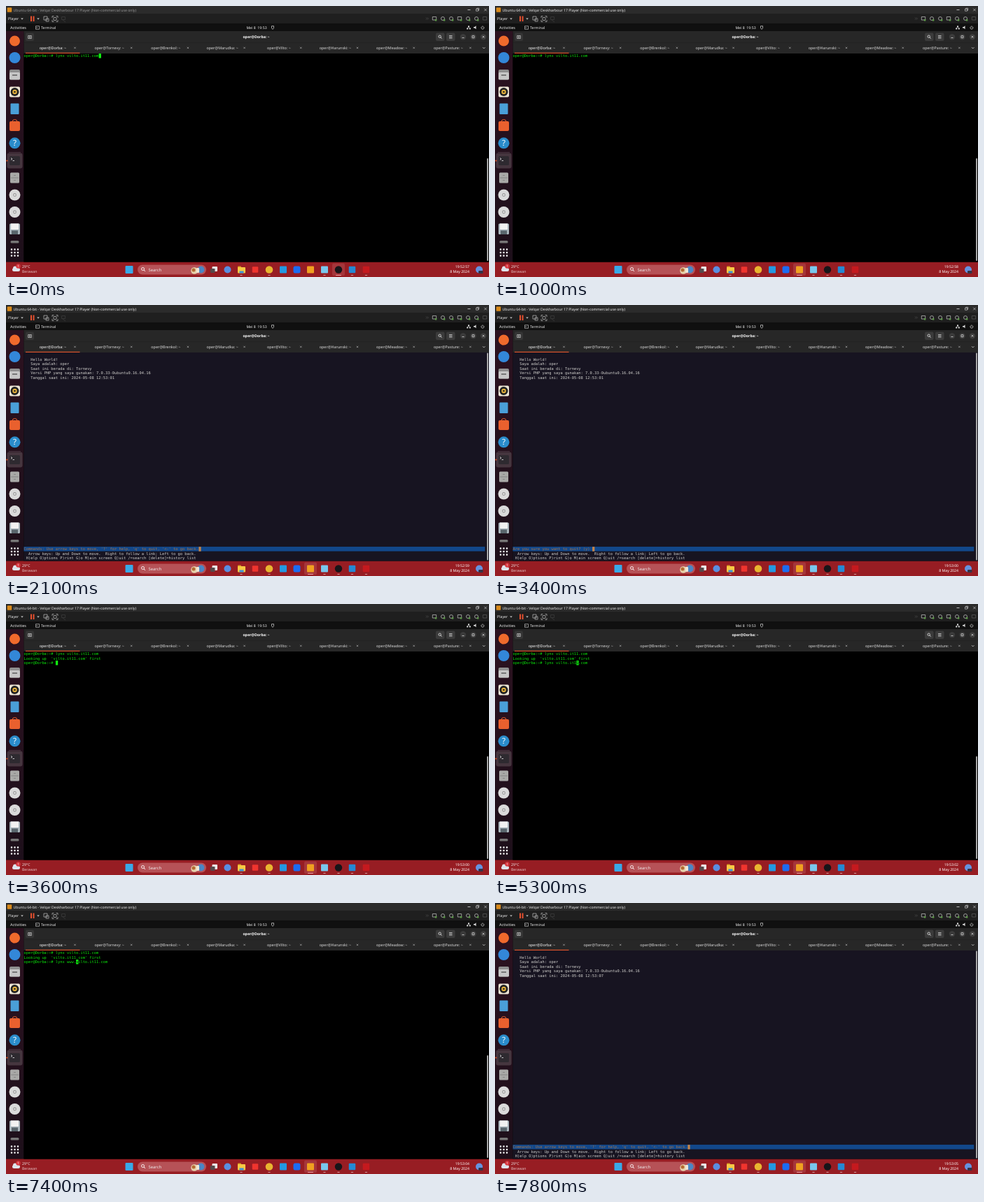
Write an HTML page that moves like this. It is 690 px wide and 388 px high and loops after 8000 ms.

```html
<!DOCTYPE html>
<html lang="en">
<head>
<meta charset="utf-8">
<title>Terminal session</title>
<style>
  html, body { margin: 0; width: 100%; height: 100%; overflow: hidden; background: #000; }
  svg { display: block; width: 690px; height: 388px; }
  text { font-family: "Noto Sans", sans-serif; white-space: pre; text-rendering: geometricPrecision; }
  .mono { font-family: "DejaVu Sans Mono", monospace; font-size: 5.39px; }
</style>
</head>
<body>
<svg viewBox="0 0 690 388">
  <defs>
    <linearGradient id="dock" x2="0" y2="1">
      <stop stop-color="#2c1220"/><stop offset="1" stop-color="#1d0f1a"/>
    </linearGradient>
  </defs>
  <g id="desk"></g>
  <g id="live"></g>
</svg>
<script>
const CELL = 3.245, ROW = 6.467, LEFT = 25.5, TOP = 68.2, COLUMNS = 203;
const USER = 'oper', HOST = 'Dorba', SITE = 'vilto.it11.com';
const PROMPT = `${USER}@${HOST}:~# `, START = PROMPT.length + 5;

const rect = (x, y, w, h, fill, r = 0) =>
  `<rect x="${x}" y="${y}" width="${w}" height="${h}" rx="${r}" fill="${fill}"/>`;
const disc = (x, y, r, fill) => `<circle cx="${x}" cy="${y}" r="${r}" fill="${fill}"/>`;
const line = (d, stroke = '#ddd', width = .8) =>
  `<path d="${d}" fill="none" stroke="${stroke}" stroke-width="${width}"/>`;
const poly = (d, fill) => `<path d="${d}" fill="${fill}"/>`;
const escape = s => s.replace(/&/g, '&amp;').replace(/</g, '&lt;');
const label = (s, x, y, size = 5.2, fill = '#eee', extra = '') =>
  `<text x="${x}" y="${y}" font-size="${size}" fill="${fill}" ${extra}>${escape(s)}</text>`;
const middle = 'text-anchor="middle"', end = 'text-anchor="end"';
const square = (x, y, s, fill, r = 1) => rect(x - s / 2, y - s / 2, s, s, fill, r);
const cross = (x, y, s, c, w) => line(`M${x - s} ${y - s}l${2 * s} ${2 * s}m0 ${-2 * s}l${-2 * s} ${2 * s}`, c, w);
const caret = (x, y, c = '#ccc') => poly(`M${x - 1.8} ${y - 1}h3.6l-1.8 2z`, c);
const mono = (s, col, row, fill) =>
  `<text class="mono" x="${LEFT + col * CELL}" y="${TOP + row * ROW + 5.1}" fill="${fill}">${escape(s)}</text>`;
const cell = (col, row, fill) => rect(LEFT + col * CELL, TOP + row * ROW - .1, CELL, ROW, fill);

function hostWindow() {
  let s = rect(0, 0, 690, 25.5, '#1f1f1f') + rect(0, 0, 690, 11, '#2b2b2b') + square(5, 5.5, 6.5, '#d98a1c');
  s += line('M659.5 5.5h4') + line('M671.5 4.2h3v3h-3zM672.7 4.2v-1h3v3h-1', '#ddd', .6) + cross(685, 5.5, 1.8, '#ddd', .6);
  s += label('Player', 3, 20) + caret(23, 18.5) + rect(35, 14.5, 2, 7.5, '#e8502e') + rect(38.5, 14.5, 2, 7.5, '#e8502e') + caret(46, 18.5);
  s += line('M54 15h5v5h-5zM57 18h4v4h-4z', '#aaa', .8);
  s += line('M66 17v-2.5h2.5m3 0H74V17m0 3v2.5h-2.5m-3 0H66V20M68 16.5h4v4h-4z', '#aaa', .8);
  s += line('M79.500 15.500h5v4h-5zM81 20l4 3', '#3c3c3c');
  s += line('M600 16.5l1.5 1.5-1.5 1.5m2-3l1.5 1.5-1.5 1.5', '#555', .6);
  for (let i = 0; i < 7; i++) {
    const x = 612 + 12 * i, c = i < 6 ? '#b5b5b5' : '#555';
    s += i % 3 ? line(`M${x - 2.5} 18a2.5 2.5 0 1 0 5 0a2.5 2.5 0 1 0-5 0`, c, .8)
               : line(`M${x - 2.7} 15.5h5.4v4.5h-5.4z`, c, .8);
    if (i < 6) s += rect(x + .8, 19, 2.5, 2.5, '#5d9b48');
  }
  return s;
}

function guestBar() {
  let s = rect(0, 25.5, 690, 11, '#101010') + label('Activities', 6, 33, 5.5);
  s += line('M42.5 28.7h5v4.6h-5zM43.7 30l1 1-1 1', '#ddd', .6) + label('Terminal', 50, 33);
  s += label('Mei 8  19:53', 358, 33, 5.2, '#eee', middle);
  s += line('M379.5 28.7h3v3l-1.5 1.7-1.5-1.7z', '#ddd', .7);
  s += rect(660, 28.4, 2, 1.8, '#ddd') + rect(658.2, 31.6, 2, 1.8, '#ddd') + rect(661.8, 31.6, 2, 1.8, '#ddd') + line('M661 30v1h-1.8v1m1.8-1h1.8v1', '#ddd', .5);
  s += poly('M668 30h1.5l2-1.7v5l-2-1.7H668z', '#ddd');
  return s + line('M679.6 29.6a2 2 0 1 0 2.6 0M680.9 28.4v2.2', '#ddd', .7);
}

function dock() {
  let s = rect(0, 36, 25.5, 330.5, 'url(#dock)');
  s += disc(12.5, 50, 7.5, '#f06a2c') + disc(12.5, 74, 8, '#3387d8');
  s += rect(5, 91, 15, 14.5, '#8f8f8f', 2) + rect(5, 95, 15, 10.5, '#c6c6c6', 1.5) + rect(9, 98, 7, 2, '#777');
  s += square(12.5, 123, 15, '#eee6d6', 2) + disc(12.5, 123, 6, '#222') + disc(12.5, 123, 3.2, '#eab43c') + disc(12.5, 123, 1.3, '#222');
  s += rect(6.5, 139.5, 12, 15.5, '#4a9fd8', 1);
  s += rect(5, 165, 15, 14, '#e9602e', 2) + line('M9 166q0-3.5 3.5-3.5t3.5 3.5', '#e9602e', 1);
  s += disc(12.5, 196.3, 8, '#2a8ccb') + label('?', 12.5, 200.4, 11.5, '#fff', middle);
  s += rect(4, 209, 17, .6, '#5b4653') + rect(1.5, 210.5, 22, 22, '#46363f', 3);
  s += rect(5, 215, 15, 13, '#2e2a30', 1.5) + line('M7 217.5l2 1.5-2 1.5m2.5 1h2.5', '#eee', .8) + disc(1.4, 221.5, 1.1, '#e95420');
  s += rect(6, 238.5, 13, 15, '#a9a9a7', 1.5) + line('M7 246h11M11 242.5h3M11 249.5h3', '#777', .7);
  for (const y of [270.5, 295]) s += disc(12.5, y, 8, '#dadada') + disc(12.5, y, 2.4, '#999') + disc(12.5, y, 1.2, '#eee');
  s += rect(5, 311.5, 15, 15.5, '#aab6bd', 1.5) + rect(7, 311.5, 11, 8.5, '#f2f2f2') + rect(8, 321.5, 9, 5.5, '#59656c');
  s += rect(6.5, 336, 12, 3.5, '#777', 1.5);
  for (let i = 0; i < 9; i++) s += square(8 + i % 3 * 4.5, 348.5 + (i / 3 | 0) * 4.5, 2.4, '#eee', .7);
  return s;
}

function terminalFrame() {
  let s = rect(25.5, 36, 664.5, 32.3, '#272727') + rect(25.5, 52, 664.5, .5, '#1c1c1c');
  s += rect(28, 38.5, 12, 11.5, '#353535', 2) + line('M31.7 42.5h4.6v4h-4.6zM34 43.3v2.4m-1.2-1.2h2.4', '#ddd', .7);
  s += label(`${USER}@${HOST}: ~`, 357.5, 46, 5.2, '#fff', middle + ' font-weight="700"');
  s += rect(614, 38.5, 12.5, 11.5, '#3b3b3b', 2) + rect(629, 38.5, 12.5, 11.5, '#3b3b3b', 2);
  s += line('M618 43.7a1.7 1.7 0 1 0 3.4 0a1.7 1.7 0 1 0-3.4 0M621 45l1.7 1.7', '#eee', .8);
  s += line('M633 42.5h4.5m-4.5 1.8h4.5m-4.5 1.8h4.5', '#eee', .7);
  for (const x of [653, 667.5, 682]) s += disc(x, 44.2, 4.2, '#3b3b3b');
  s += line('M651.5 45.5h3M666 42.7h3v3h-3z', '#eee', .7) + cross(682, 44.2, 1.4, '#eee', .7);
  [HOST, 'Tornevy', 'Brenkol', 'Marudka', 'Vilto', 'Harunski', 'Meadow', 'Pasture'].forEach((host, i) => {
    const x = 67 + 80.7 * i;
    s += label(`${USER}@${host}: ~`, x, 61.7, 5.4, i ? '#ddd' : '#fff', middle) + cross(x + 31.5, 59.9, 1.2, '#bbb', .6);
  });
  return s + rect(28, 66.8, 77.5, 1.2, '#d9532c') + line('M681 59.2l1.7 1.7 1.7-1.7', '#ddd', .8);
}

function taskbar() {
  let s = rect(0, 366.5, 690, 21.5, '#971d23');
  s += rect(9, 375, 11, 5, '#dfe4ec', 2.5) + disc(13, 375.5, 3, '#dfe4ec') + disc(17.5, 372.5, 3.2, '#d8363f') + label('1', 17.5, 374.3, 4.6, '#fff', middle);
  s += label('29°C', 23, 375) + label('Berawan', 23, 382, 5.2, '#e4c3c4');
  s += square(176, 377.5, 11, '#39a9e8') + rect(188, 370.5, 98, 14, '#b65257', 7);
  s += line('M193.5 376.5a2 2 0 1 0 4 0a2 2 0 1 0-4 0M197 378l2 2', '#fff', .9) + label('Search', 203.5, 379.6, 5.9);
  s += disc(269, 379, 4.8, '#e6d1aa') + disc(268, 378, 2.5, '#b46a32') + disc(278.5, 377.5, 5, '#4a86c5') + rect(272, 375, 4, 7, '#f0e6d4', 1);
  s += rect(294.5, 373, 7.5, 7, '#e9e9e9', 1) + rect(292, 376, 6.5, 6, '#55494b', 1);
  s += disc(316.5, 377.5, 5, '#5a8ee0');
  s += rect(331, 372.5, 5, 4, '#d99b21', 1) + rect(331, 374, 11, 8.5, '#f7c844', 1) + rect(333.5, 379.5, 6, 3, '#3c91d8');
  s += square(356, 377.5, 8.5, '#f0342e') + disc(376, 377.5, 5.3, '#e9b530') + square(396, 377.5, 10, '#2399e2');
  s += square(415.5, 377.5, 10, '#1c6cf2', 2.5);
  for (const x of [336, 376, 455, 475, 494.5, 514.5]) s += rect(x - 1.7, 385, 3.4, 1, '#d29a9c', .5);
  return s + disc(676, 377.5, 5, '#6693df') + rect(675, 379, 6.5, 4, '#343446', 1);
}

// Icons that sit above the moving focus highlight
function runningApps(focused) {
  const x = focused ? 435 : 475;
  return rect(x - 9, 368.5, 18, 17.5, '#a4363b', 2) + rect(x - 4, 385, 8, 1, '#f0a4a6', .5) +
    square(435, 377.5, 10, '#f0a020') + square(455, 377.5, 10, '#79c7ed') + disc(475, 377.5, 5.2, '#171519') +
    square(494.5, 377.5, 9.5, '#2489d4') + square(514.5, 377.5, 9.5, '#c5191e');
}

function shell(lines, col, visible) {
  const row = lines.length - 1;
  let s = rect(25.5, 68, 664.5, 298.5, '#000') + rect(687, 218, 2, 147, '#a8a8a8', 1);
  lines.forEach((text, i) => { s += mono(text, 0, i, '#0be60b'); });
  if (visible) s += cell(col, row, '#1f1') + mono(lines[row][col] || '', col, row, '#000');
  return s;
}

function page(second, status) {
  const rows = ['Hello World!', `Saya adalah: ${USER}`, 'Saat ini berada di: Tornevy',
    'Versi PHP yang saya gunakan: 7.0.33-0ubuntu0.16.04.16', `Tanggal saat ini: 2024-05-08 12:53:0${second}`];
  let s = rect(25.5, 68, 664.5, 298.5, '#171421') + rect(687, 68.5, 2, 297, '#a8a8a8', 1);
  rows.forEach((text, i) => { s += mono(text, 3, i + 1, '#d0cfcc'); });
  s += rect(LEFT, TOP + 43 * ROW - .2, COLUMNS * CELL, ROW, '#12488b') + mono(status, 0, 43, '#a2734c') + cell(status.length, 43, '#c4844a');
  s += mono('Arrow keys: Up and Down to move.  Right to follow a link; Left to go back.', 2, 44, '#d0cfcc');
  return s + mono('H)elp O)ptions P)rint G)o M)ain screen Q)uit /=search [delete]=history list', 1, 45, '#d0cfcc');
}

const HELP = "Commands: Use arrow keys to move, '?' for help, 'q' to quit, '<-' to go back.";
const QUIT = 'Are you sure you want to quit? (y) ';
const first = `${PROMPT}lynx ${SITE}`;

function terminal(t) {
  if (t < 2100) return shell([first], first.length, t < 600 || t >= 1200);
  if (t < 3600) return page(1, t < 2900 ? HELP : QUIT);
  if (t >= 7500) return page(7, HELP);
  const typed = [6500, 6600, 6800, 7000].filter(k => t >= k).length;
  const command = t < 4500 ? PROMPT : `${PROMPT}lynx ${'www.'.slice(0, typed)}${SITE}`;
  let col = command.length;
  if (t >= 5300) col = Math.max(START, START + 9 - Math.floor((t - 5300) / 100 * 1.5)) + typed;
  else if (t >= 4800) col--;
  return shell([first, `Looking up  '${SITE}' first`, command], col, t < 4200 || t >= 4500);
}

function scene(t) {
  const seconds = 57 + Math.floor((t + 200) / 1000);
  const clock = `19:${52 + Math.floor(seconds / 60)}:${String(seconds % 60).padStart(2, '0')}`;
  const focused = t >= 900;
  return terminal(t) + runningApps(focused) +
    label('Ubuntu 64-bit - Velqar Deskharbour 17 Player (Non-commercial use only)', 10.5, 7.5, 5.15, focused ? '#eee' : '#999') +
    label(clock, 662, 375, 5.1, '#fff', end) + label('8 May 2024', 662, 382, 5.2, '#fff', end);
}

const live = document.getElementById('live');
document.getElementById('desk').innerHTML = hostWindow() + guestBar() + dock() + terminalFrame() + taskbar();
let shown = '';
function tick() {
  const next = scene(performance.now() % 8000);
  if (next !== shown) live.innerHTML = shown = next;
  requestAnimationFrame(tick);
}
tick();
</script>
</body>
</html>
```
